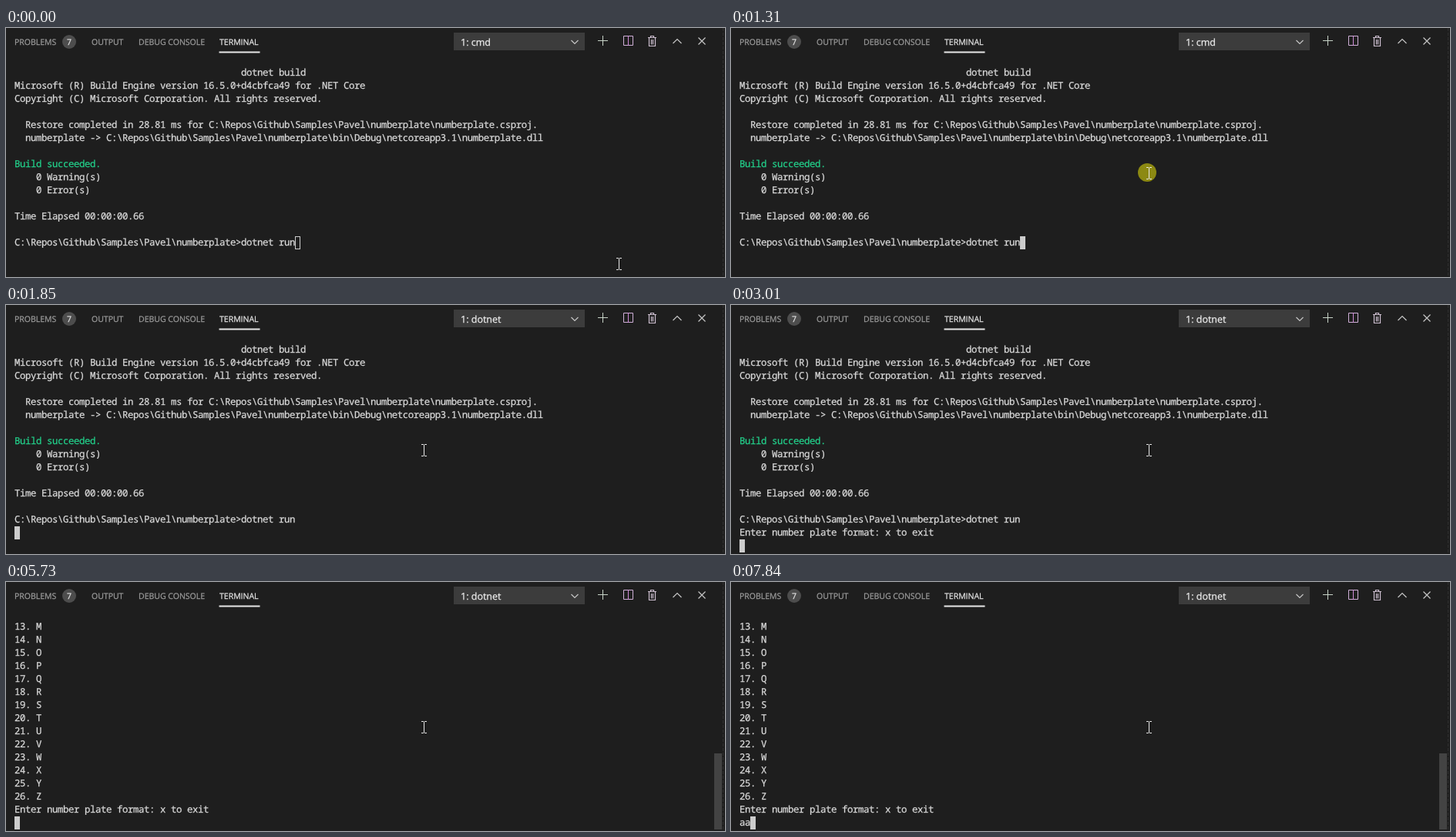
Write an HTML page that moves like this. It is 933 by 324 pixels and loops after 8000 ms.

```html
<!DOCTYPE html>
<html lang="en">
<head>
<meta charset="utf-8">
<title>Terminal</title>
<style>
html, body { margin: 0; width: 100%; height: 100%; overflow: hidden; background: #1e1e1e; }
svg { display: block; }
text { white-space: pre; text-rendering: geometricPrecision; stroke-width: .25px; }
.term { font: 12.3px "Noto Sans Mono", "DejaVu Sans Mono", monospace; letter-spacing: -.38px; fill: #dcdcdc; stroke: #dcdcdc; }
.term .ok { fill: #23d18b; stroke: #23d18b; }
.tabs { font: 10.5px "Open Sans", "Noto Sans", sans-serif; fill: #9c9c9c; }
.tabs text { stroke: #9c9c9c; }
.tabs .on { fill: #e7e7e7; stroke: #e7e7e7; }
.tabs rect { stroke: none; }
.pick { font: 12.5px "Open Sans", "Noto Sans", sans-serif; fill: #f0f0f0; stroke: #f0f0f0; }
.icons { fill: none; stroke: #c5c5c5; }

/* every change is a hard cut within one 8 s loop */
.t { animation: 8s step-end infinite; }
#build { animation-name: build; }
#list { animation-name: list; }
#ask { animation-name: ask; }
#key1 { animation-name: key1; }
#key2 { animation-name: key2; }
#cmd { animation-name: cmd; }
#dotnet { animation-name: dotnet; }
#click { animation-name: click; }
#mouse { animation-name: mouse; }
#caret { animation-name: caret; }
#block { animation-name: block; }
@keyframes build { 0% { opacity: 1 } 71.625%, 100% { opacity: 0 } }
@keyframes list { 0% { opacity: 0 } 71.625%, 100% { opacity: 1 } }
@keyframes ask { 0% { opacity: 0 } 37.625%, 100% { opacity: 1 } }
@keyframes key1 { 0%, 71.625% { opacity: 0 } 66.875%, 93%, 100% { opacity: 1 } }
@keyframes key2 { 0% { opacity: 0 } 98%, 100% { opacity: 1 } }
@keyframes cmd { 0% { opacity: 1 } 23.125%, 100% { opacity: 0 } }
@keyframes dotnet { 0% { opacity: 0 } 23.125%, 100% { opacity: 1 } }
@keyframes click { 0%, 17.375%, 100% { opacity: 0 } 16.375% { opacity: 1 } }
@keyframes block { 0% { fill-opacity: 0 } 16.375%, 100% { fill-opacity: 1 } }
@keyframes mouse {
  0% { transform: translate(795px, 299px) }
  .875% { transform: translate(690px, 250px) }
  1.875% { transform: translate(582px, 200px) }
  2.75%, 100% { transform: translate(542px, 181px) }
}
@keyframes caret {
  0% { transform: translate(375px, 271px) }
  22.125% { transform: translate(11px, 288px) }
  37.625%, 71.625% { transform: translate(11px, 305px) }
  66.875%, 93% { transform: translate(18px, 305px) }
  98%, 100% { transform: translate(25px, 305px) }
}
</style>
</head>
<body>
<svg width="933" height="324" viewBox="0 0 933 324">
  <rect width="933" height="324" fill="#1e1e1e"/>
  <path d="M930.5 0V324" stroke="#303030" stroke-dasharray="4 2"/>

  <g class="tabs">
    <text x="11" y="22">PROBLEMS</text>
    <circle cx="82" cy="18" r="9" fill="#4d4d4d"/>
    <text x="82" y="22" text-anchor="middle" class="on">7</text>
    <text x="111" y="22">OUTPUT</text>
    <text x="172" y="22">DEBUG CONSOLE</text>
    <text x="277" y="22" class="on">TERMINAL</text>
    <rect x="277" y="31" width="52" height="1" class="on"/>
  </g>

  <rect x="581" y="6" width="170" height="23" fill="#3c3c3c"/>
  <g class="pick">
    <text id="cmd" class="t" x="590" y="22.5">1: cmd</text>
    <text id="dotnet" class="t" x="590" y="22.5">1: dotnet</text>
  </g>

  <g class="icons">
    <path d="M733.5 16l4.5 4.5 4.5-4.5" stroke-width="1.2"/>
    <path d="M768 16.5h13M774.5 10v13" stroke="#c8d4c8"/>
    <path d="M801.5 10.5h12v12h-12z" stroke="#d0b0d8"/>
    <path d="M807.5 10v13" stroke="#d08ad8"/>
    <path d="M833 12.5h11M836.5 12v-1.5h4V12M834.5 13v10.5h8V13M837.5 15v6.5M839.5 15v6.5" stroke="#cdbfd0" stroke-width="1.2"/>
    <path d="M865.5 20l5.5-5.5 5.5 5.5M898.5 12.5l9 9M907.5 12.5l-9 9" stroke-width="1.2"/>
  </g>

  <g class="term">
    <g id="build" class="t"></g>
    <g id="list" class="t">
      <rect x="919" y="223" width="10" height="99" fill="#434343" stroke="none"/>
    </g>
    <g id="ask" class="t"></g>
    <g id="key1" class="t"></g>
    <g id="key2" class="t"></g>
  </g>

  <g id="caret" class="t">
    <rect id="block" class="t" x=".5" y=".5" width="6" height="16" fill="#ccc" stroke="#ccc"/>
  </g>
  <circle id="click" class="t" cx="540" cy="188" r="12" fill="#8c8912"/>
  <path id="mouse" class="t" fill="#e8e8e8" d="M-3 0h3v1h-3zM1 0h3v1h-3zM0 1h1v14h-1zM-3 15h3v1h-3zM1 15h3v1h-3z"/>
</svg>
<script>
const buildLog = String.raw`${" ".repeat(42)}dotnet build
Microsoft (R) Build Engine version 16.5.0+d4cbfca49 for .NET Core
Copyright (C) Microsoft Corporation. All rights reserved.

  Restore completed in 28.81 ms for C:\Repos\Github\Samples\Pavel\numberplate\numberplate.csproj.
  numberplate -> C:\Repos\Github\Samples\Pavel\numberplate\bin\Debug\netcoreapp3.1\numberplate.dll

Build succeeded.
    0 Warning(s)
    0 Error(s)

Time Elapsed 00:00:00.66

C:\Repos\Github\Samples\Pavel\numberplate>dotnet run`.split("\n");

// Writes one terminal line; columns are 7px, rows 17px.
function print(id, line, row, col = 0) {
  const text = document.createElementNS("http://www.w3.org/2000/svg", "text");
  const indent = line.search(/\S/);
  if (indent < 0) return;
  text.setAttribute("x", 11 + (col + indent) * 7);
  text.setAttribute("y", 62 + row * 17);
  text.textContent = line.trim();
  if (line.startsWith("Build ")) text.setAttribute("class", "ok");
  document.getElementById(id).append(text);
}

buildLog.forEach((line, row) => print("build", line, row));
for (let n = 13; n <= 26; n++) print("list", `${n}. ${String.fromCharCode(64 + n)}`, n - 13);
print("ask", "Enter number plate format: x to exit", 14);
print("key1", "a", 15);
print("key2", "a", 15, 1);
</script>
</body>
</html>
```
